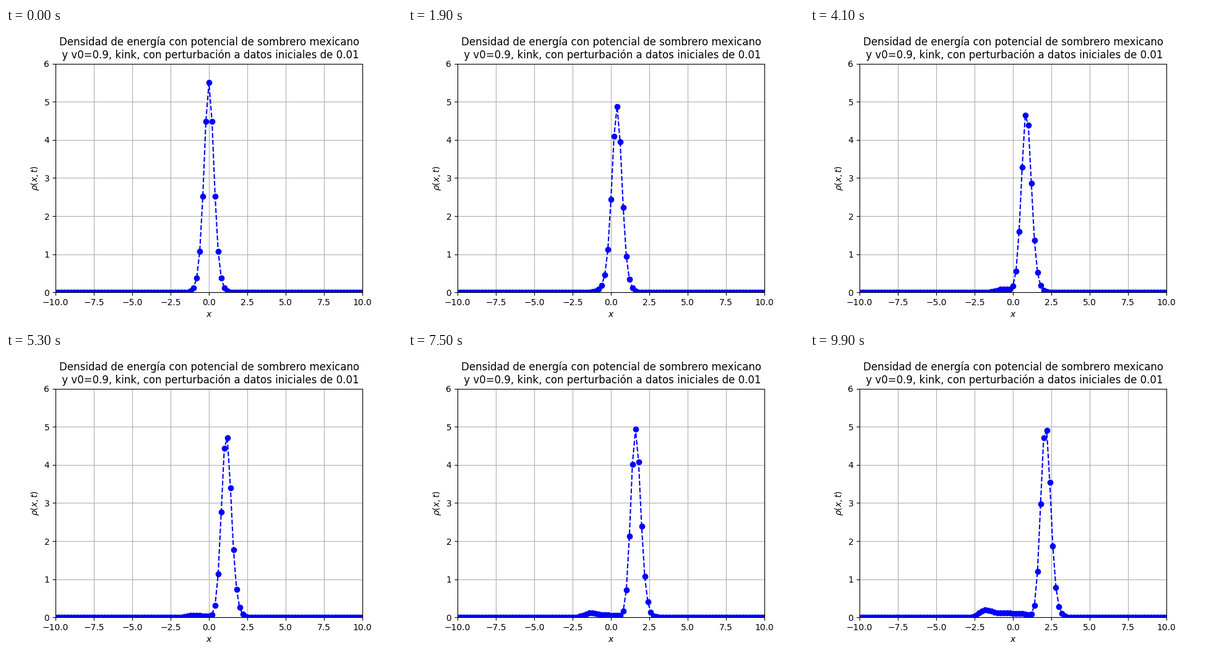
Write a matplotlib script that moves like this. It is 640 by 480 pixels and loops after 10 s.

```python
import numpy as np
import matplotlib.pyplot as plt
from matplotlib.animation import FuncAnimation

FRAMES = 100
STEP_MS = 100

x = np.linspace(-10, 10, 101)


def logistic(z):
    return 1 / (1 + np.exp(-z))


def bell(z):
    return np.exp(-z**2)


def center(s):
    """Kink position: a short start-up lag, then almost constant speed."""
    return 2.108 * s - 0.6 * s * np.exp(-12.4 * s) + 0.01 * s**6


def kink(s):
    """Lorentz-contracted sech^4 pulse whose rear flank steepens with time."""
    d = x - center(s)
    tail = np.maximum(-d, 0)
    peak = 4.55 + 0.51 * s + 0.95 * bell(s / 0.16)
    front = 1.61 - 0.085 * s
    back = 1.61 - 2.3 * s * np.exp(-10 * s)
    steep = 0.5 * logistic((s - 0.43) / 0.1)
    u = np.where(d > 0, front * d, back * tail + steep * tail**3)
    return peak / np.cosh(np.minimum(u, 30))**4


def wake(s):
    """Energy shed at the start, then a plateau led by a left-moving crest."""
    d = x + 1.85 * s
    shed = 0.135 * bell((s - 0.3) / 0.13) * bell((x + 0.5) / 0.57)
    crest = 0.1 * bell(d / 0.57)
    plateau = 0.11 * logistic((d + 0.3) / 0.17) * logistic((center(s) - 1 - x) / 0.25)
    return shed + s**2 * (crest + plateau)


def density(i):
    s = i / (FRAMES - 1)
    return kink(s) + wake(s)


fig, ax = plt.subplots(figsize=(6.4, 4.8), dpi=100)
line, = ax.plot(x, density(0), color="blue", linestyle="--", marker="o")
ax.set_xlim(-10, 10)
ax.set_ylim(0, 6)
ax.set_xlabel("$x$")
ax.set_ylabel(r"$\rho(x,t)$")
ax.set_title("Densidad de energía con potencial de sombrero mexicano\n"
             " y v0=0.9, kink, con perturbación a datos iniciales de 0.01")
ax.grid(True)


def update(i):
    line.set_ydata(density(i))
    return line,


anim = FuncAnimation(fig, update, frames=FRAMES, interval=STEP_MS,
                     repeat=True, repeat_delay=0)
plt.show()
```
